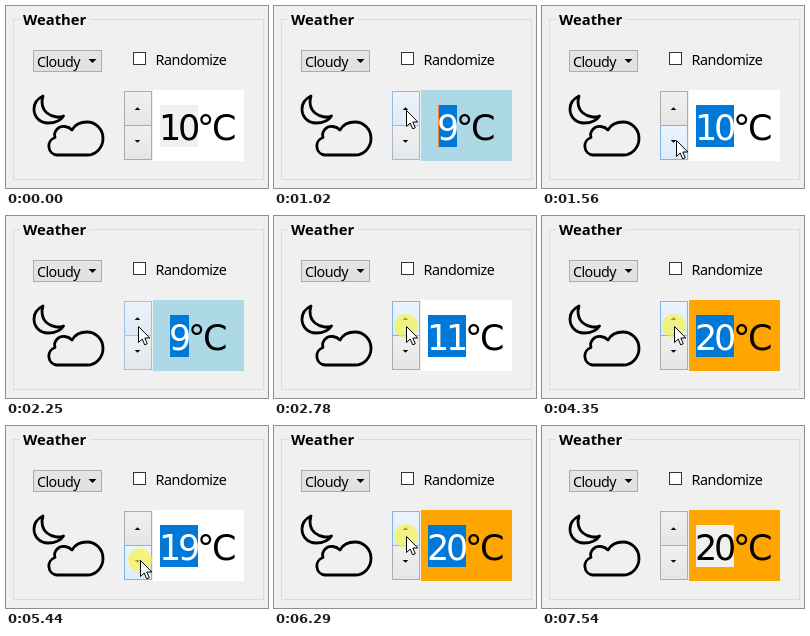
An HTML page with a canvas that plays this animation: 262x182 px, repeating every 7.6 s.

```html
<!DOCTYPE html>
<html lang="en">
<head>
<meta charset="utf-8">
<title>Weather</title>
<style>
html, body { margin: 0; width: 100%; height: 100%; overflow: hidden; background: #f0f0f0; }
canvas { display: block; width: 262px; height: 182px; }
</style>
</head>
<body>
<canvas id="stage" width="262" height="182"></canvas>
<script>
const ctx = document.getElementById('stage').getContext('2d');
const LOOP = 7600;
const SMALL = '14.3px "Noto Sans", "Open Sans", sans-serif';
const BOLD = 'bold 14.8px "Noto Sans", "Open Sans", sans-serif';
const BIG = '35px "DejaVu Sans", sans-serif';

const SEAM = 119;
const ENTER = 70, LEAVE = 7150, FOCUS = 630, BLUR = 7460;
const point = (x, y) => ({ x, y });
const START = point(150, 172), UP = point(132, 110), DOWN = point(134, 134);

const moves = [
  { from: ENTER, to: 550, spot: DOWN },
  { from: 860, to: 1000, spot: point(132, 104) },
  { from: 1330, to: 1560, spot: DOWN },
  { from: 2030, to: 2270, spot: UP },
  { from: 4750, to: 5050, spot: DOWN },
  { from: 5590, to: 5820, spot: UP },
  { from: 6920, to: LEAVE, spot: point(186, 137) }
];

const run = Array.from({ length: 9 }, (_, i) => 2720 + i * 152);
const presses = [FOCUS, 1180, 1630, 2330, ...run, 4280, 5280, 6220];
const hold = on => on < 3900 ? 78 : 165;

const clamp = v => Math.min(1, Math.max(0, v));
const ease = k => k * k * (3 - 2 * k);

function pointerAt(t) {
  if (t < ENTER || t >= LEAVE) return null;
  return moves.reduce((p, m) => {
    const k = ease(clamp((t - m.from) / (m.to - m.from)));
    return point(p.x + (m.spot.x - p.x) * k, p.y + (m.spot.y - p.y) * k);
  }, START);
}

// Each press on the upper button adds one, on the lower takes one
function valueAt(t) {
  return presses.filter(on => on <= t)
    .reduce((sum, on) => sum + (pointerAt(on).y < SEAM ? 1 : -1), 10);
}

// Share of recent moments the pointer spent on a button, as a soft fade
function hover(t, top) {
  let hits = 0;
  for (let i = 0; i < 6; i++) {
    const p = pointerAt(t - i * 22);
    if (p && p.x >= 118 && p.x < 146 && p.y >= top && p.y < top + 34) hits++;
  }
  return hits / 6;
}

function rect(x, y, w, h, color) {
  ctx.fillStyle = color;
  ctx.fillRect(x, y, w, h);
}

function frame(x, y, w, h, color) {
  ctx.strokeStyle = color;
  ctx.lineWidth = 1;
  ctx.strokeRect(x + .5, y + .5, w - 1, h - 1);
}

function text(str, x, y, font, spacing, color = '#000') {
  ctx.font = font;
  ctx.letterSpacing = spacing + 'px';
  ctx.fillStyle = color;
  ctx.fillText(str, x, y);
}

function face(x, y, w, h, from, to, border) {
  const g = ctx.createLinearGradient(0, y, 0, y + h);
  g.addColorStop(0, from);
  g.addColorStop(1, to);
  rect(x, y, w, h, g);
  frame(x, y, w, h, border);
}

function arrow(x, y, half, dir) {
  ctx.fillStyle = '#000';
  ctx.beginPath();
  ctx.moveTo(x - half, y);
  ctx.lineTo(x + half, y);
  ctx.lineTo(x, y + dir * half);
  ctx.fill();
}

function buttons(t) {
  const tops = [85, SEAM];
  tops.forEach(y => face(118, y, 28, 35, '#f0f0f0', '#e5e5e5', '#acacac'));
  tops.forEach(y => {
    ctx.globalAlpha = hover(t, y);
    face(118, y, 28, 35, '#ecf4fc', '#dcecfc', '#7eb4ea');
  });
  ctx.globalAlpha = 1;
  arrow(131.5, 104, 2.8, -1);
  arrow(131.5, 134, 2.8, 1);
}

const moon = new Path2D('M37 90C31 93 28 98 28 103C28 111 34 117 42 117C49 117 55 114 57.500 110C53 112 46 111 41 107C36 103 35 96 37 90Z');
const cloud = new Path2D('M51 149A9 9 0 0 1 49 131.500C47 125 53 119.500 59 120.500C62 121 64 122 66 124C69 118.500 75 116 81 116A16 16.500 0 0 1 81 149Z');

function weatherIcon() {
  ctx.lineWidth = 2.8;
  ctx.lineJoin = 'round';
  ctx.strokeStyle = '#000';
  ctx.stroke(moon);
  ctx.stroke(cloud);
  ctx.lineJoin = 'miter';
}

function panel() {
  rect(0, 0, 262, 182, '#f0f0f0');
  frame(7, 13, 251, 161, '#dcdcdc');
  rect(14, 5, 70, 18, '#f0f0f0');
  text('Weather', 17, 19, BOLD, 0);
  face(27, 44, 69, 22, '#e5e5e5', '#e0e0e0', '#acacac');
  text('Cloudy', 31, 60.5, SMALL, -.55);
  arrow(86.5, 53, 4, 1);
  rect(127, 46, 13, 13, '#fff');
  frame(127, 46, 13, 13, '#333');
  text('Randomize', 149.5, 59, SMALL, -.45);
  weatherIcon();
}

function field(t) {
  const value = valueAt(t);
  const active = t >= FOCUS && t < BLUR;
  const w = 19 * String(value).length;
  const x = Math.round(173 - w / 2);
  rect(147, 84, 91, 71, value < 10 ? '#add8e6' : value < 20 ? '#fff' : '#ffa500');
  rect(x, 99, w, 42, active ? '#0078d7' : '#f0f0f0');
  text(String(value), x - 1, 134, BIG, -3.25, active ? '#fff' : '#000');
  text('°C', x + w - 1, 134, BIG, -2.6);
  if (t >= FOCUS && t < 1130) rect(x, 99, 1, 42, '#ff8728');
}

const cursor = new Path2D('M0 0V16L3.700 12.500L6.200 18.300L8.800 17.200L6.300 11.500H11.300Z');

function pointer(t) {
  const p = pointerAt(t);
  if (!p) return;
  if (presses.some(on => t >= on && t < on + hold(on))) {
    ctx.fillStyle = 'rgba(248,243,65,.66)';
    ctx.beginPath();
    ctx.arc(p.x, p.y, 12, 0, Math.PI * 2);
    ctx.fill();
  }
  ctx.save();
  ctx.translate(Math.round(p.x) + .5, Math.round(p.y) + .5);
  ctx.lineWidth = 1;
  ctx.fillStyle = '#fff';
  ctx.fill(cursor);
  ctx.strokeStyle = '#000';
  ctx.stroke(cursor);
  ctx.restore();
}

const start = performance.now();
function tick() {
  const t = (performance.now() - start) % LOOP;
  panel();
  field(t);
  buttons(t);
  pointer(t);
  requestAnimationFrame(tick);
}
tick();
</script>
</body>
</html>
```
